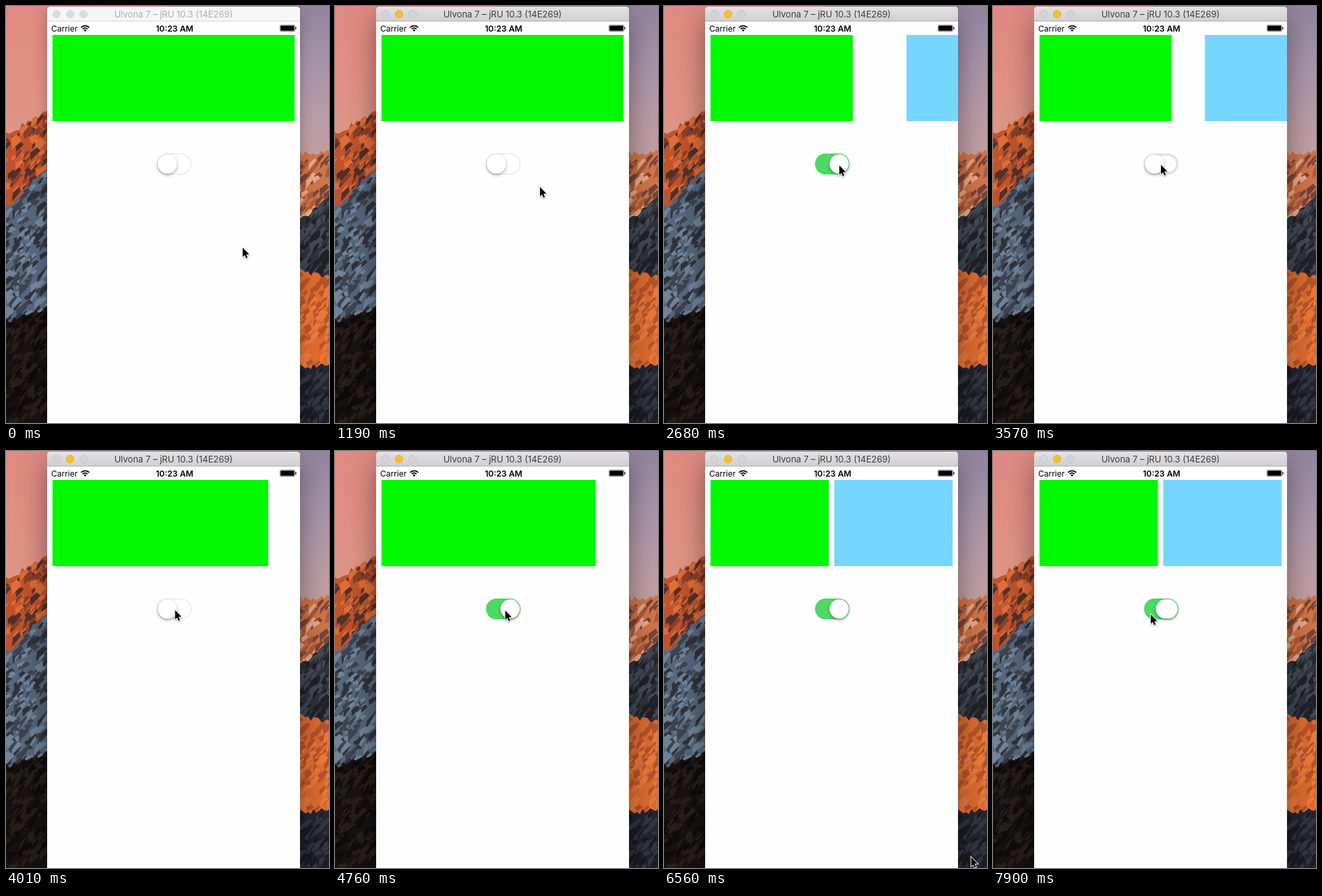
An HTML page with a canvas that plays this animation: 479x619 px, repeating every 8 s.

```html
<!DOCTYPE html>
<html lang="en">
<head>
<meta charset="utf-8">
<title>Toggle animation</title>
<style>
html, body { margin: 0; width: 100%; height: 100%; overflow: hidden; background: #fff; }
canvas { display: block; }
</style>
</head>
<body>
<canvas id="stage" width="479" height="619"></canvas>
<script>
const W = 479, H = 619, LOOP = 8000, STEP = 148.95;
const ctx = document.getElementById('stage').getContext('2d');
const backdrop = document.createElement('canvas');
backdrop.width = W;
backdrop.height = H;

const clamp = v => Math.max(0, Math.min(1, v));
const lerp = (a, b, k) => a + (b - a) * k;

// cubic-bezier(.42, 0, .58, 1)
function ease(x) {
  let lo = 0, hi = 1, s = .5;
  for (let i = 0; i < 24; i++) {
    s = (lo + hi) / 2;
    const bx = 3 * (1 - s) * s * (.42 * (1 - s) + .58 * s) + s * s * s;
    if (bx < x) lo = s; else hi = s;
  }
  return s * s * (3 - 2 * s);
}

function random(seed) {
  return () => (seed = (seed * 16807) % 2147483647) / 2147483647;
}

function pill(x, y, w, h, r, color) {
  ctx.beginPath();
  ctx.roundRect(x, y, w, h, r);
  ctx.fillStyle = color;
  ctx.fill();
}

function rect(x, y, w, h, color) {
  ctx.fillStyle = color;
  ctx.fillRect(x, y, w, h);
}

function gradient(y0, y1, colors) {
  const g = ctx.createLinearGradient(0, y0, 0, y1);
  colors.forEach((c, i) => g.addColorStop(i / (colors.length - 1), c));
  return g;
}

function text(str, x, y, font, color, align) {
  ctx.font = font + ' Inter, Roboto, sans-serif';
  ctx.textAlign = align;
  ctx.fillStyle = color;
  ctx.fillText(str, x, y);
}

// ---- wallpaper ----
function sky(c, x, colors) {
  c.fillStyle = gradient(0, 230, colors);
  c.fillRect(x, 0, W / 2, 240);
}

// a jagged slope filled to the bottom, streaked in the given colours
function slope(c, x, yLeft, yRight, depth, [base, ...streaks], seed) {
  const rnd = random(seed), width = 64;
  c.save();
  c.beginPath();
  for (let i = 0; i <= width; i += 4) c.lineTo(x + i, lerp(yLeft, yRight, i / width) + rnd() * 9 - 4.5);
  c.lineTo(x + width, H);
  c.lineTo(x, H);
  c.fillStyle = base;
  c.fill();
  c.clip();
  for (let i = 0; i < depth; i++) {
    const px = x + rnd() * width, len = 6 + rnd() * 16, thick = 1 + rnd() * 4;
    const py = lerp(yLeft, yRight, (px - x) / width) + rnd() * depth;
    c.beginPath();
    c.moveTo(px, py);
    c.lineTo(px + thick, py + thick);
    c.lineTo(px - len * .5, py + len);
    c.lineTo(px - len * .3 - thick, py + len * .4);
    c.fillStyle = streaks[i % streaks.length];
    c.fill();
  }
  c.restore();
}

function paintBackdrop(c) {
  sky(c, 0, ['#df8a82', '#e08f84', '#dc9a88']);
  sky(c, W / 2, ['#94839f', '#a492a8', '#b89aa6', '#c2a0a0']);
  [
    [0, 192, 152, 140, ['#c0532b', '#52302a', '#e06d36', '#8a4029']],
    [0, 300, 238, 220, ['#56677c', '#30323a', '#70849b', '#3d4450']],
    [0, 468, 446, 150, ['#17120f', '#261e1a', '#0e0b0a']],
    [436, 219, 216, 110, ['#cf7448', '#74443a', '#e9a985', '#b05a38']],
    [436, 320, 262, 130, ['#2f323b', '#434a57', '#202127']],
    [436, 394, 406, 135, ['#dd6a2f', '#b4532a', '#ea7a3a']],
    [436, 537, 530, 85, ['#22242e', '#323542', '#191a21']]
  ].forEach((layer, i) => slope(c, ...layer, 1000 + i * 77));
}

// ---- simulator window ----
function dot(x, fill, ring) {
  ctx.beginPath();
  ctx.arc(x, 12, 5.6, 0, 7);
  ctx.fillStyle = fill;
  ctx.fill();
  ctx.lineWidth = .8;
  ctx.strokeStyle = ring;
  ctx.stroke();
}

function drawWindow(active) {
  ctx.save();
  ctx.shadowColor = `rgba(0,0,0,${active ? .42 : .28})`;
  ctx.shadowBlur = active ? 40 : 20;
  ctx.shadowOffsetY = active ? 16 : 8;
  pill(61, 1, 375, 660, [5, 5, 0, 0], '#fefefe');
  ctx.restore();

  pill(61, 1, 375, 22, [5, 5, 0, 0], active ? gradient(1, 23, ['#e4e2e4', '#d0ced0']) : '#f6f6f6');
  rect(61, 22, 375, 1, active ? '#b4b2b4' : '#d8d8d8');

  const grey = active ? '#d5d3d5' : '#dcdcdc', ring = active ? '#c1bfc1' : '#d2d2d2';
  dot(75, grey, ring);
  dot(95, active ? '#fdbd2f' : grey, active ? '#e6a828' : ring);
  dot(115, grey, ring);
  text('Ulvona 7 – jRU 10.3 (14E269)', 248.5, 17, '13px', active ? '#3e3d3e' : '#adadad', 'center');
}

function drawStatus() {
  text('Carrier', 67, 38, '12px', '#000', 'left');
  text('10:23 AM', 250, 38, '600 12.2px', '#000', 'center');

  // wifi: a wedge and two arcs
  const fan = r => {
    ctx.beginPath();
    ctx.arc(117.3, 37.7, r, -Math.PI * .76, -Math.PI * .24);
  };
  ctx.strokeStyle = ctx.fillStyle = '#000';
  ctx.lineWidth = 1.7;
  for (const r of [5, 8.3]) {
    fan(r);
    ctx.stroke();
  }
  fan(2.8);
  ctx.lineTo(117.3, 38);
  ctx.fill();

  ctx.lineWidth = .5;
  ctx.beginPath();
  ctx.roundRect(406.3, 28.3, 22.2, 9.4, 2);
  ctx.stroke();
  pill(407.2, 29.2, 20.2, 7.6, 1, '#000');
  pill(429.2, 31.3, 1.3, 3.4, 1, '#000');
}

// ---- app content ----
const toggles = [1986, 3342, 4438, 7990];
const PRESS = 120;

// 0 = off, 1 = on; each toggle reverses the direction
function progress(t, duration) {
  let v = 0;
  toggles.forEach((start, i) => {
    if (t >= start) v = Math.abs(i % 2 - ease(clamp((t - start) / duration)));
  });
  return v;
}

function drawPanels(p) {
  const rest = 1 - p, width = 175.5 + 183.5 * rest;
  rect(69, 43, width, 128, '#00f900');
  const left = 252.5 + 553 * rest;
  const right = Math.min(436, left + width);
  if (right > left) rect(left, 43, right - left, 128, '#76d6ff');
}

function drawSwitch(on, pressed) {
  const k = clamp((on - .18) / .82);
  const mix = (a, b) => Math.round(lerp(a, b, k));
  pill(224, 219, 51, 31, 15.5, `rgb(${mix(226, 76)},${mix(226, 217)},${mix(226, 100)})`);
  const edge = 1 + 14.5 * on;
  if (edge < 15.4) pill(224 + edge, 219 + edge, 51 - 2 * edge, 31 - 2 * edge, 15.5 - edge, '#fefefe');

  const w = pressed ? 32.5 : 28.5;
  ctx.save();
  ctx.shadowColor = 'rgba(0,0,0,.35)';
  ctx.shadowBlur = 4;
  ctx.shadowOffsetY = 2;
  pill(lerp(225, 274 - w, k), 220.3, w, 28.5, 14.25, '#fff');
  ctx.restore();
}

// ---- cursor ----
// first step, last step, destination
const moves = [
  [0, 1, 340, 334], [2, 6, 266, 229], [7, 8, 303.5, 268], [9, 13, 259.5, 236],
  [19, 22, 248.5, 235], [25, 29, 252, 236], [38, 44, 455, 602], [46, 53, 233.5, 242]
];

function cursorAt(step) {
  let x = 350.5, y = 358;
  for (const [from, to, tx, ty] of moves) {
    const k = ease(clamp((step - from) / (to - from)));
    x = lerp(x, tx, k);
    y = lerp(y, ty, k);
  }
  return [x, y];
}

const arrow = new Path2D('M0 0V14.3L3.2 11.4L5.4 16.6L7.7 15.6L5.5 10.5L10 10.3Z');

function drawCursor([x, y]) {
  ctx.save();
  ctx.translate(x + .5, y + .8);
  ctx.scale(.95, .95);
  ctx.shadowColor = 'rgba(0,0,0,.35)';
  ctx.shadowBlur = 2;
  ctx.shadowOffsetY = 1;
  ctx.lineWidth = 2;
  ctx.strokeStyle = '#fff';
  ctx.stroke(arrow);
  ctx.shadowColor = 'transparent';
  ctx.fillStyle = '#000';
  ctx.fill(arrow);
  ctx.restore();
}

function draw(now) {
  const step = Math.floor((now % LOOP + 12) / STEP);
  const t = step * STEP;
  ctx.drawImage(backdrop, 0, 0);
  drawWindow(step >= 8);
  drawStatus();
  drawPanels(progress(t, 1000));
  drawSwitch(progress(t, 330), toggles.some(s => t >= s - PRESS && t < s));
  drawCursor(cursorAt(step));
}

paintBackdrop(backdrop.getContext('2d'));
let origin;
function frame(now) {
  origin ??= now;
  draw(Math.max(0, now - origin));
  requestAnimationFrame(frame);
}
draw(0);
requestAnimationFrame(frame);
</script>
</body>
</html>
```
